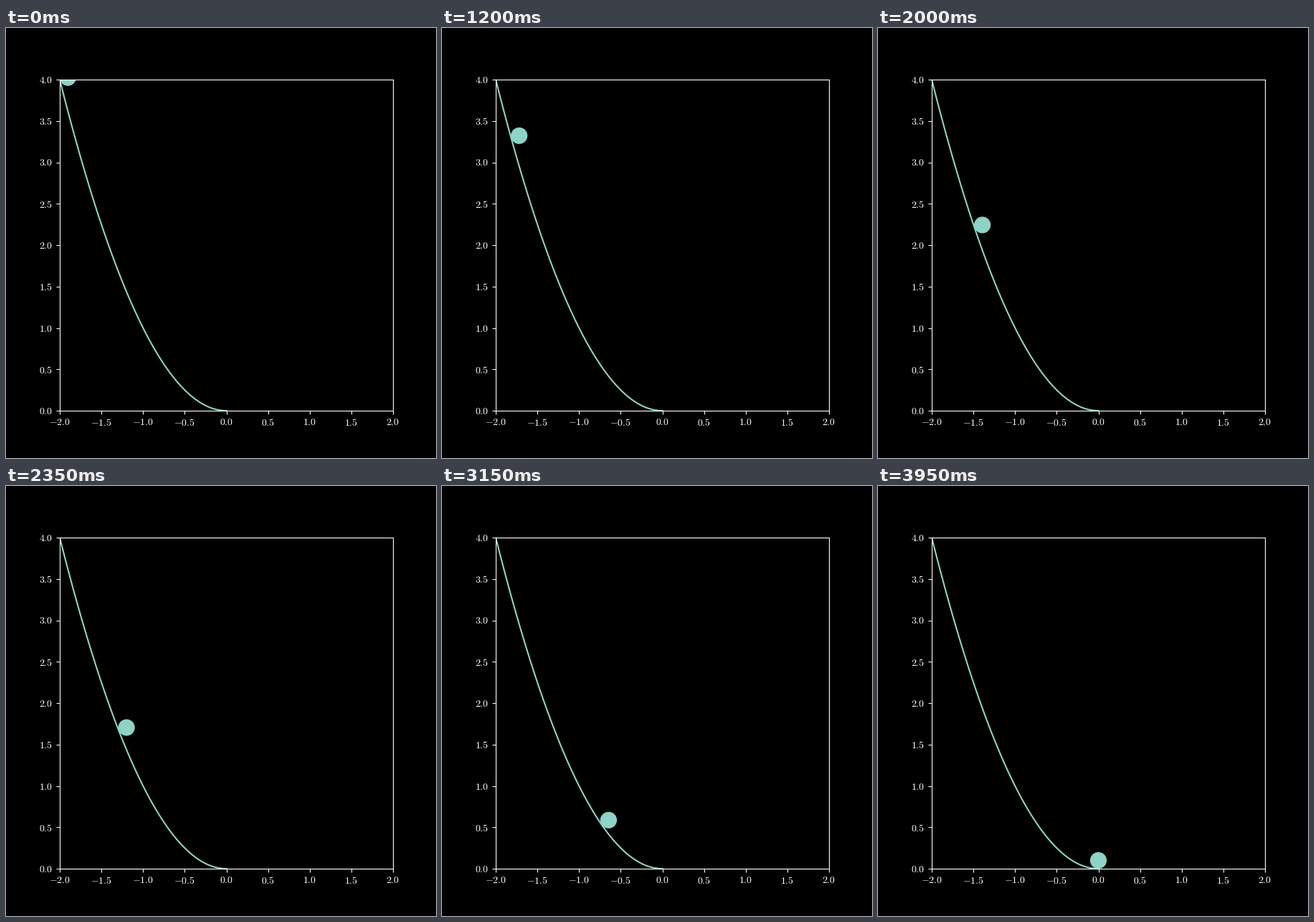
These frames come from a looping animation (600x600 px, 4 s). A matplotlib script:

```python
import numpy as np
import matplotlib.pyplot as plt
from matplotlib.animation import FuncAnimation

plt.style.use("dark_background")
plt.rcParams.update({
    "font.family": "Liberation Serif",
    "mathtext.fontset": "cm",
    "font.size": 10,
})

FRAMES = 80
INTERVAL = 50
RADIUS = 0.1


def height(x):
    return x**2


def ball_center(x):
    """Centre of a ball resting on the curve at x, offset along the normal."""
    slope = 2 * x
    norm = np.hypot(slope, 1)
    return x - RADIUS * slope / norm, height(x) + RADIUS / norm


def tick_label(value, _pos):
    return rf"$\mathrm{{{value:.1f}}}$"


fig, ax = plt.subplots(figsize=(6, 6), dpi=100)
ax.set_xlim(-2, 2)
ax.set_ylim(0, 4)
for axis in (ax.xaxis, ax.yaxis):
    axis.set_ticks(np.linspace(*axis.get_view_interval(), 9))
    axis.set_major_formatter(tick_label)

xs = np.linspace(-2, 0, 100)
ax.plot(xs, height(xs), color="C0", lw=1.5)
ball = ax.add_patch(plt.Circle(ball_center(-2), RADIUS, fc="C0", ec="none"))


def update(i):
    # constant acceleration along x, from rest
    t = i / (FRAMES - 1)
    ball.center = ball_center(-2 + 2 * t**2)
    return (ball,)


anim = FuncAnimation(fig, update, frames=FRAMES, interval=INTERVAL,
                     repeat=True, repeat_delay=0)
plt.show()
```
